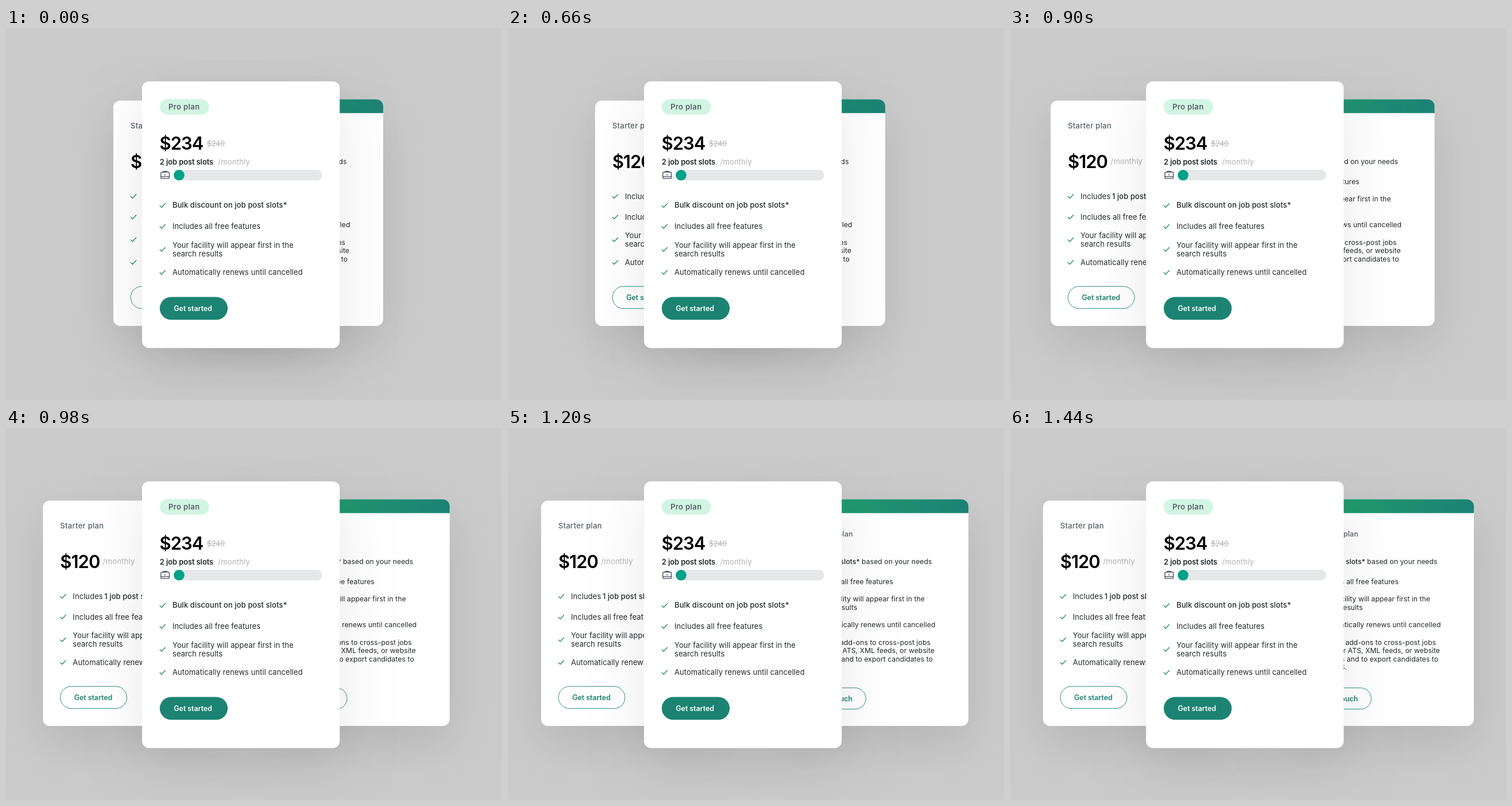
Write an HTML page with a canvas that moves like this. It is 864 px wide and 648 px high and loops after 2220 ms.

```html
<!DOCTYPE html>
<html lang="en">
<head>
<meta charset="utf-8">
<title>Pricing cards</title>
<style>
  html, body { margin: 0; width: 100%; height: 100%; overflow: hidden; background: #cbcbcb; }
  canvas { display: block; width: 864px; height: 648px; }
</style>
</head>
<body>
<canvas id="stage"></canvas>
<script>
const W = 864, H = 648, LOOP = 2220, STEP = 20;
const GREEN = '#1c8373', INK = '#25292c', TITLE = '#566064', MUTED = '#b1b2b4';
const canvas = document.getElementById('stage');
const ctx = canvas.getContext('2d');
const dpr = window.devicePixelRatio || 1;
canvas.width = W * dpr;
canvas.height = H * dpr;

// Cubic bezier easing (0.5, 0, 0, 1)
function ease(x) {
  if (x <= 0) return 0;
  if (x >= 1) return 1;
  let lo = 0, hi = 1;
  for (let i = 0; i < 30; i++) {
    const s = (lo + hi) / 2;
    if (1.5 * s * (1 - s) ** 2 + s ** 3 < x) lo = s; else hi = s;
  }
  return lo * lo * (3 - 2 * lo);
}

const slide = (t, start, from, to) => from + (to - from) * ease((t - start) / 800);

function text(str, x, y, { size = 13, weight = 400, color = INK, gap = 0.07, align = 'left' } = {}) {
  ctx.font = `${weight} ${size}px Inter, "Open Sans", sans-serif`;
  ctx.letterSpacing = gap + 'px';
  ctx.fillStyle = color;
  ctx.textAlign = align;
  ctx.fillText(str, x, y);
}

function box(x, y, w, h, r) {
  ctx.beginPath();
  ctx.roundRect(x, y, w, h, r);
}

function fillBox(x, y, w, h, r, color) {
  box(x, y, w, h, r);
  ctx.fillStyle = color;
  ctx.fill();
}

function card(x, y, w, h, alpha) {
  ctx.save();
  ctx.shadowColor = `rgba(0, 0, 0, ${alpha})`;
  ctx.shadowBlur = 84 * dpr;
  ctx.shadowOffsetY = 30 * dpr;
  fillBox(x, y, w, h, 12, '#fff');
  ctx.restore();
}

function check(x, y) {
  ctx.beginPath();
  ctx.moveTo(x, y + 0.2);
  ctx.lineTo(x + 3.4, y + 3.5);
  ctx.lineTo(x + 10, y - 3.5);
  ctx.strokeStyle = '#1f8c6e';
  ctx.lineWidth = 1.3;
  ctx.stroke();
}

function outlineButton(x, y, w, h) {
  box(x, y, w, h, h / 2);
  ctx.strokeStyle = '#2a8e7e';
  ctx.lineWidth = 1;
  ctx.stroke();
}

const price = (str, x, y) => text(str, x, y, { size: 31, weight: 600, color: '#000', gap: -1 });
const label = { size: 12.5, weight: 600, gap: -0.08 };

function starter(x) {
  card(x, 126.5, 330, 392.5, 0.11);
  text('Starter plan', x + 30, 175, { weight: 500, color: TITLE, gap: 0.3 });
  price('$120', x + 30, 244);
  text('/monthly', x + 104.5, 237, { color: MUTED, gap: 0.2 });
  [293, 329, 368.5, 408].forEach(y => check(x + 30, y));
  text('Includes', x + 52, 298);
  text('1 job post slot', x + 107, 298, { weight: 500 });
  text('Includes all free features', x + 52, 334);
  text('Your facility will appear first in the', x + 52, 366);
  text('search results', x + 52, 381);
  text('Automatically renews until cancelled', x + 52, 412.5);
  outlineButton(x + 30.2, 450.1, 116, 38.6);
  text('Get started', x + 54.3, 474, { ...label, color: GREEN });
}

function custom(right) {
  const x = right - 330;
  card(x, 124.2, 330, 394.8, 0.11);
  const bar = ctx.createLinearGradient(x, 0, right, 0);
  bar.addColorStop(0, '#22a669');
  bar.addColorStop(1, '#1c8175');
  fillBox(x, 124.2, 330, 24, [12, 12, 0, 0], bar);

  const line = (str, inset, y, style) =>
    text(str, right - inset, y, { size: 12.2, gap: 0.06, align: 'right', ...style });
  line('Custom plan', 201, 189, { size: 12.4, weight: 500, color: TITLE, gap: 0.25 });
  line('Custom job post slots*', 189, 237, { weight: 500 });
  line('based on your needs', 63.5, 237);
  line('Includes all free features', 131, 272);
  line('Your facility will appear first in the', 76, 302);
  line('search results', 193.5, 316.5);
  line('Automatically renews until cancelled', 57.5, 347);
  line('Optional add-ons to cross-post jobs', 66, 377.5);
  line('from your ATS, XML feeds, or website', 59, 392);
  line('feeds and to export candidates to', 62, 406.5);
  line('your ATS.', 221, 421);
  outlineButton(right - 299, 452.7, 120.3, 37);
  line('Get in touch', 202, 476, { ...label, color: GREEN });
}

function briefcase() {
  ctx.strokeStyle = '#3f4958';
  ctx.lineWidth = 1.3;
  box(269.8, 251.2, 14.6, 11, 1);
  ctx.moveTo(274, 251.2);
  ctx.lineTo(274, 249.6);
  ctx.lineTo(280.2, 249.6);
  ctx.lineTo(280.2, 251.2);
  ctx.moveTo(269.8, 258.8);
  ctx.lineTo(284.4, 258.8);
  ctx.stroke();
  fillBox(276, 255, 2.2, 1.6, 0.4, '#3f4958');
}

function pro() {
  card(237, 93, 344.3, 464.5, 0.085);
  fillBox(267.8, 123.7, 86, 27.4, 13.7, '#d2f5e3');
  text('Pro plan', 283, 142, { weight: 600, color: TITLE, gap: 0.4 });
  price('$234', 267.5, 212);
  text('$240', 350, 205.5, { size: 12.5, color: MUTED, gap: -0.1 });
  fillBox(350, 200.6, 31, 1, 0, MUTED);
  text('2 job post slots', 267.8, 238, { weight: 600, gap: -0.12 });
  text('/monthly', 369.5, 238, { color: MUTED, gap: 0.2 });
  briefcase();
  fillBox(292, 247, 258.8, 18.6, 9.3, '#e6e7e8');
  fillBox(292.2, 247, 18.6, 18.6, 9.3, '#02a189');

  [309, 345.5, 385.5, 425.5].forEach(y => check(267.7, y));
  text('Bulk discount on job post slots*', 290, 313.3, { weight: 500, gap: 0.1 });
  text('Includes all free features', 290, 350);
  text('Your facility will appear first in the', 290, 382.5);
  text('search results', 290, 398);
  text('Automatically renews until cancelled', 290, 430);
  fillBox(267.8, 468.5, 118.4, 39.7, 19.85, GREEN);
  text('Get started', 292.3, 493, { ...label, color: '#fff' });
}

function draw(t) {
  ctx.setTransform(dpr, 0, 0, dpr, 0, 0);
  ctx.fillStyle = '#cbcbcb';
  ctx.fillRect(0, 0, W, H);
  starter(slide(t, 450, 187, 57.5));
  custom(slide(t, 640, 657, 808));
  pro();
}

const start = performance.now();
function tick() {
  const t = (performance.now() - start) % LOOP;
  draw(Math.floor(t / STEP) * STEP);
  requestAnimationFrame(tick);
}
tick();
</script>
</body>
</html>
```
